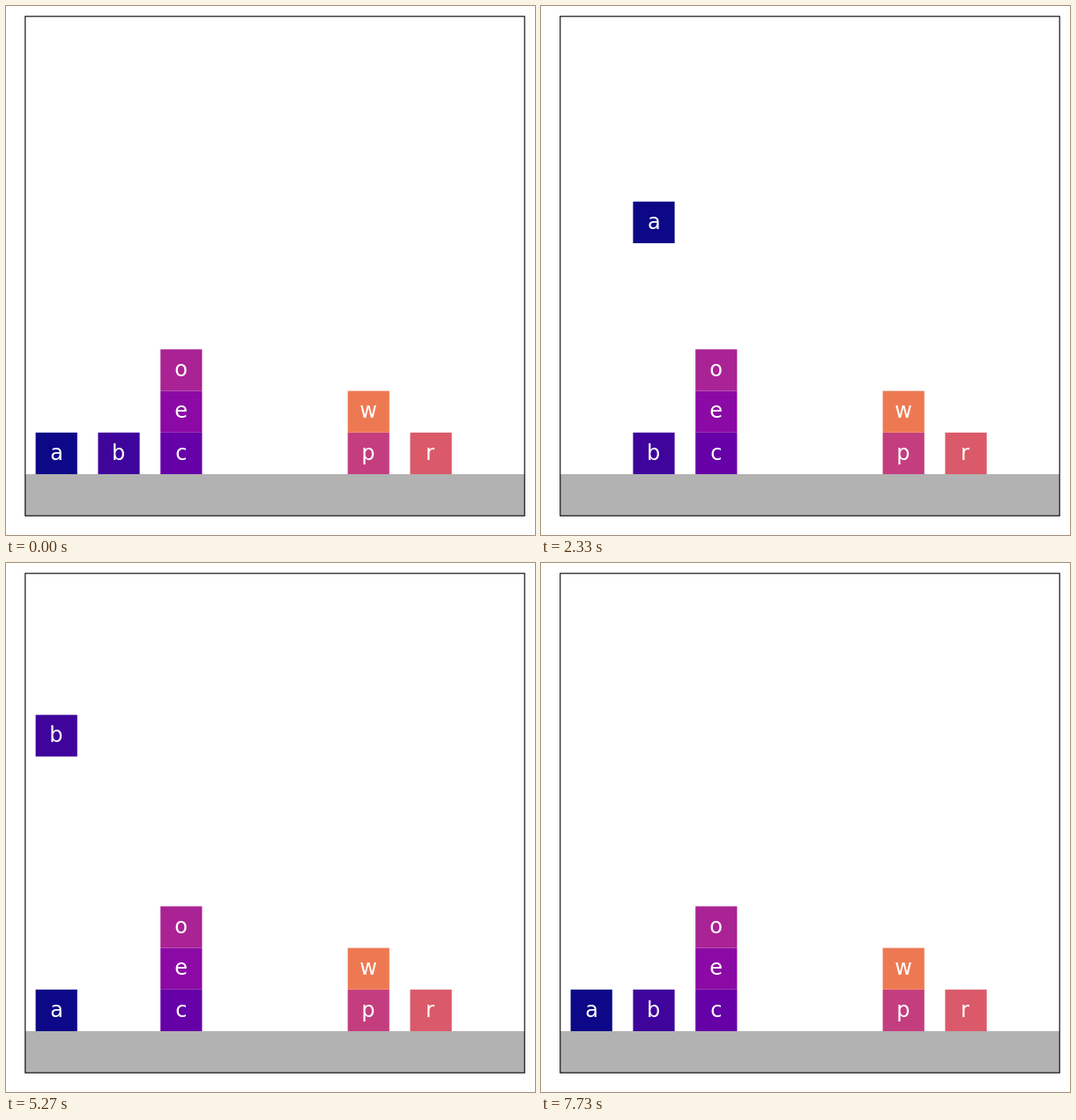
Write an HTML page with a canvas that moves like this. It is 600 px wide and 600 px high and loops after 7760 ms.

```html
<!DOCTYPE html>
<html>
<head>
<meta charset="utf-8">
<style>
html, body { margin: 0; width: 100%; height: 100%; overflow: hidden; background: #fff; }
canvas { display: block; }
</style>
</head>
<body>
<canvas id="stage" width="600" height="600"></canvas>
<script>
const ctx = document.getElementById("stage").getContext("2d");
const LOOP = 7760, CYCLE = 58, UNIT = 47.2, GROUND = 531, TOP = 8;
const colors = {
  a: "#0d0887", b: "#3f049c", c: "#6600a7", e: "#8b0aa5",
  o: "#aa2395", p: "#c43e7f", r: "#da5a6a", w: "#ed7953"
};
// Resting blocks: [column, level]
const fixed = { c: [2, 0], e: [2, 1], o: [2, 2], p: [5, 0], w: [5, 1], r: [6, 0] };

// Each cycle carries a block between columns, lowers it to a level,
// then lifts a block; a and b give the resting places meanwhile.
const cycles = [
  { drop: "b", from: 1, to: 1, level: 0, lift: "a", liftCol: 0, a: [0, 0], b: [1, 0] },
  { drop: "a", from: 0, to: 1, level: 1, lift: "a", liftCol: 1, a: [1, 1], b: [1, 0] },
  { drop: "a", from: 1, to: 0, level: 0, lift: "b", liftCol: 1, a: [0, 0], b: [1, 0] },
  { drop: "b", from: 1, to: 0, level: 1, lift: "b", liftCol: 0, a: [0, 0], b: [0, 1] },
  { drop: "b", from: 0, to: 1, level: 0, lift: "a", liftCol: 0, a: [0, 0], b: [1, 0] }
];

const mix = (from, to, k) => from + (to - from) * k;

function drawBlock(name, [col, level]) {
  const x = 33.6 + col * 1.5 * UNIT;
  const y = GROUND - (level + 1) * UNIT;
  ctx.fillStyle = colors[name];
  ctx.fillRect(x, y, UNIT, UNIT);
  ctx.fillStyle = "#fff";
  const m = ctx.measureText(name);
  const inkMid = (m.actualBoundingBoxRight - m.actualBoundingBoxLeft) / 2;
  ctx.fillText(name, x + UNIT / 2 - inkMid, y + UNIT / 2 + 7.2);
}

function pose(step) {
  const cycle = cycles[Math.floor(step / CYCLE)];
  const u = step % CYCLE;
  const places = { ...fixed, a: cycle.a, b: cycle.b };
  if (u < 9) {
    places[cycle.drop] = [mix(cycle.from, cycle.to, u ? (u + 1) / 10 : 0), TOP];
  } else if (u < 29) {
    places[cycle.drop] = [cycle.to, mix(TOP, cycle.level, (u - 9) / 20)];
  } else if (u > 29) {
    const base = cycle[cycle.lift][1];
    places[cycle.lift] = [cycle.liftCol, mix(base, TOP, Math.min(1, (u - 28) / 20))];
  }
  return places;
}

function draw(now) {
  const t = Math.floor((now % LOOP) / 10);
  const step = 29 + Math.floor((t + 0.5) * 0.3); // 30 steps per second
  ctx.fillStyle = "#fff";
  ctx.fillRect(0, 0, 600, 600);
  ctx.fillStyle = "#b2b2b2";
  ctx.fillRect(21.8, GROUND, 12 * UNIT, UNIT);
  ctx.font = "24px 'DejaVu Sans', sans-serif";
  const places = pose(step);
  for (const name in colors) drawBlock(name, places[name]);
  ctx.lineWidth = 1.1;
  ctx.strokeStyle = "#000";
  ctx.strokeRect(21.8, 11.8, 12 * UNIT, 12 * UNIT);
}

const start = performance.now();
function loop() {
  draw(performance.now() - start);
  requestAnimationFrame(loop);
}
loop();
</script>
</body>
</html>
```
